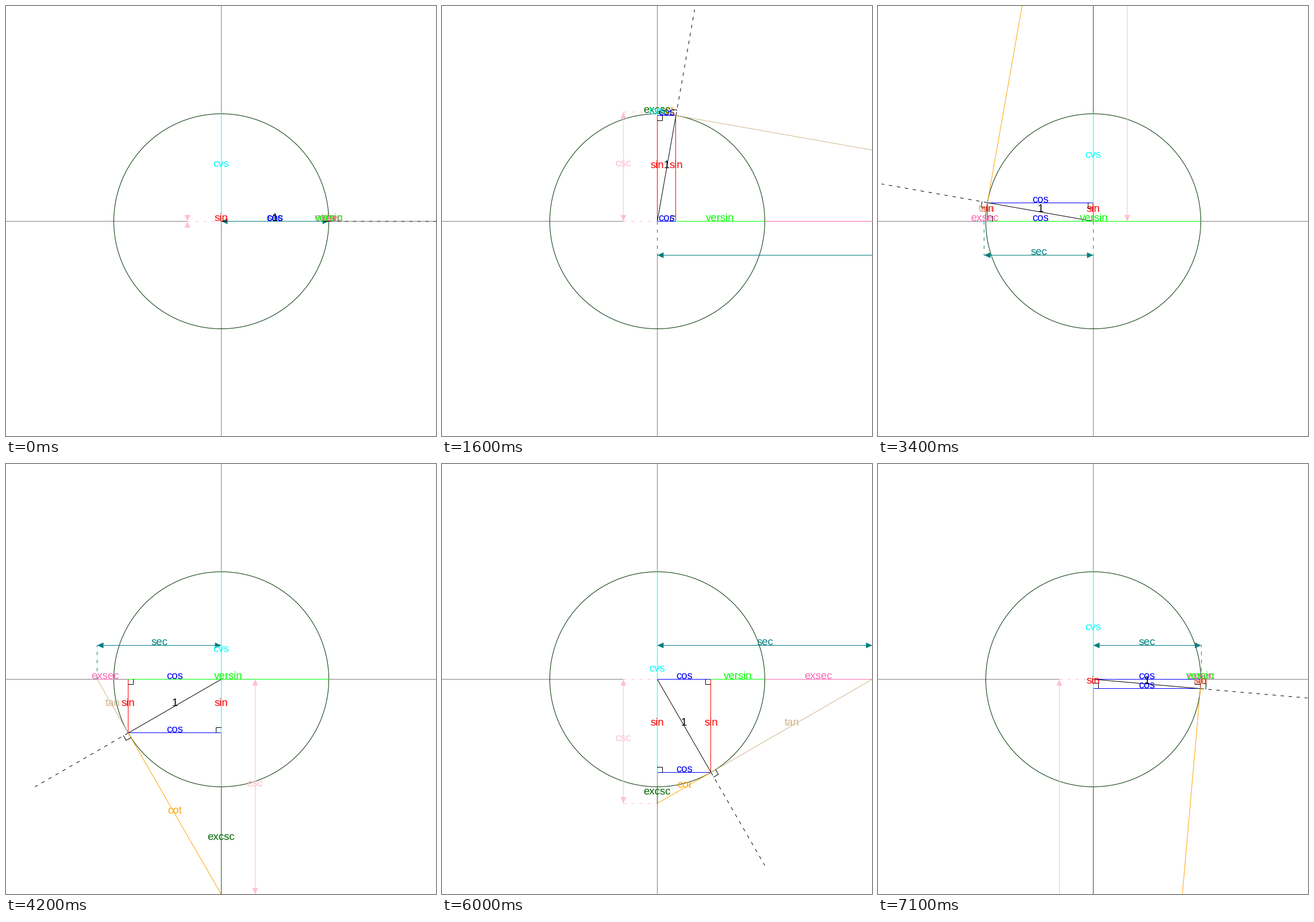
A matplotlib script that plays this animation: 748 px wide and 748 px high, repeating every 7.2 s.

```python
import math

import matplotlib.pyplot as plt
from matplotlib.animation import FuncAnimation
from matplotlib.patches import Circle, Polygon

SIZE = 748
DPI = 100
PX = 72 / DPI          # one pixel in points
FRAMES = 72
MID = 374.5            # centre of the middle pixel
R = 187
GAP = 59               # distance of the dimension arrows from the axes
MARK = 0.05 * R        # side of the right-angle marks
FAR = 10000            # stand-in for infinity, in pixels

fig = plt.figure(figsize=(SIZE / DPI, SIZE / DPI), dpi=DPI, facecolor="white")
ax = fig.add_axes([0, 0, 1, 1])
ax.set_xlim(0, SIZE)
ax.set_ylim(SIZE, 0)
ax.axis("off")

parts = []


def to_pixel(v):
    """Centre of the pixel that holds v; exact borders go to the lower one."""
    return math.floor(v - 0.01) + 0.5


def is_straight(points):
    """True if every segment is horizontal or vertical."""
    return all(min(abs(a[0] - b[0]), abs(a[1] - b[1])) < 0.01
               for a, b in zip(points, points[1:]))


def line(points, color, dashed=False):
    """Draw a one-pixel line through points given relative to the centre."""
    xs = [MID + x for x, y in points]
    ys = [MID - y for x, y in points]
    if is_straight(points):
        xs = [to_pixel(x) for x in xs]
        ys = [to_pixel(y) for y in ys]
    style = {"dashes": (6, 8), "dash_capstyle": "butt"} if dashed else {}
    parts.extend(ax.plot(xs, ys, color=color, lw=PX, snap=False,
                         solid_joinstyle="miter", **style))


def guide(a, b, color):
    """Dashed line with white gaps."""
    line([a, b], "white")
    line([a, b], color, dashed=True)


def head(tip, dx, dy, color):
    """Arrowhead with its tip at a point, aimed along (dx, dy)."""
    x, y = tip
    bx, by = x - 11 * dx, y - 11 * dy
    corners = [(x, y), (bx - 5 * dy, by + 5 * dx), (bx + 5 * dy, by - 5 * dx)]
    shape = Polygon([(MID + u, MID - v) for u, v in corners], snap=False,
                    facecolor=color, edgecolor="none", zorder=2)
    parts.append(ax.add_patch(shape))


def dimension(a, b, dx, dy, color):
    line([a, b], color)
    head(a, -dx, -dy, color)
    head(b, dx, dy, color)


def label(text, a, b, color):
    """Text with its baseline on the midpoint of a and b."""
    x = MID + (a[0] + b[0]) / 2
    y = MID - (a[1] + b[1]) / 2
    if -60 < x < SIZE + 60 and -30 < y < SIZE + 30:
        parts.append(ax.text(x, to_pixel(y) - 0.5, text, color=color,
                             ha="center", va="baseline",
                             family="Liberation Sans", fontsize=18.67 * PX))


def sign(v):
    return (v > 0) - (v < 0)


def inverse(v):
    """R / v, kept within a finite range."""
    return max(-FAR, min(FAR, R / v)) if v else 0


def square(corner, u, v):
    """Right-angle mark at a corner, spanned by two directions."""
    x, y = corner
    ux, uy = (MARK * c for c in u)
    vx, vy = (MARK * c for c in v)
    line([(x + ux, y + uy), (x + ux + vx, y + uy + vy), (x + vx, y + vy)],
         "black")


def draw(i):
    while parts:
        parts.pop().remove()

    angle = 2 * math.pi * i / FRAMES
    c, s = math.cos(angle), math.sin(angle)
    sx, sy = sign(c), sign(s)
    up = -1 if s < 0 else 1
    sec, csc = inverse(c), inverse(s)

    o = (0, 0)
    p = (R * c, R * s)
    foot, side = (p[0], 0), (0, p[1])
    sec_pt, csc_pt = (sec, 0), (0, csc)
    east, north = (R, 0), (0, R)
    x_rim, y_rim = (sx * R, 0), (0, sy * R)
    sec_a, sec_b = (0, -sy * GAP), (sec, -sy * GAP)
    csc_a, csc_b = (-sx * GAP, 0), (-sx * GAP, csc)

    line([o, foot], "blue")
    line([side, p], "blue")
    line([o, side], "red")
    line([foot, p], "red")
    line([o, p], "black")
    line([p, (2 * p[0], 2 * p[1])], "black", dashed=True)
    line([p, sec_pt], "tan")
    if s:
        line([p, csc_pt], "orange")

    guide(o, sec_a, "teal")
    guide(sec_pt, sec_b, "teal")
    dimension(sec_a, sec_b, sx, 0, "teal")
    guide(csc_a, o, "pink")
    guide(csc_b, csc_pt, "pink")
    dimension(csc_a, csc_b, 0, up, "pink")

    if s:
        line([y_rim, csc_pt], "darkgreen")
    line([x_rim, sec_pt], "hotpink")
    line([foot, east], "lime")
    line([side, north], "cyan")

    square(foot, (-sx, 0), (0, sy))
    square(side, (sx, 0), (0, -sy))
    square(p, (c, s), (-s, c))

    label("sec", sec_a, sec_b, "teal")
    label("cos", o, foot, "blue")
    label("cos", side, p, "blue")
    label("1", o, p, "black")
    label("sin", o, side, "red")
    label("sin", foot, p, "red")
    label("tan", p, sec_pt, "tan")
    if s:
        label("cot", p, csc_pt, "orange")
        label("csc", csc_a, csc_b, "pink")
        label("excsc", y_rim, csc_pt, "darkgreen")
    label("exsec", x_rim, sec_pt, "hotpink")
    label("versin", foot, east, "lime")
    label("cvs", side, north, "cyan")
    return parts


ax.plot([0, SIZE], [MID, MID], color="#808080", lw=PX, snap=False)
ax.plot([MID, MID], [0, SIZE], color="#808080", lw=PX, snap=False)
ax.add_patch(Circle((MID, MID), R, fill=False, edgecolor="#003300",
                    lw=PX, zorder=2))

anim = FuncAnimation(fig, draw, frames=FRAMES, interval=100,
                     init_func=lambda: [], repeat=True, repeat_delay=0)
plt.show()
```
